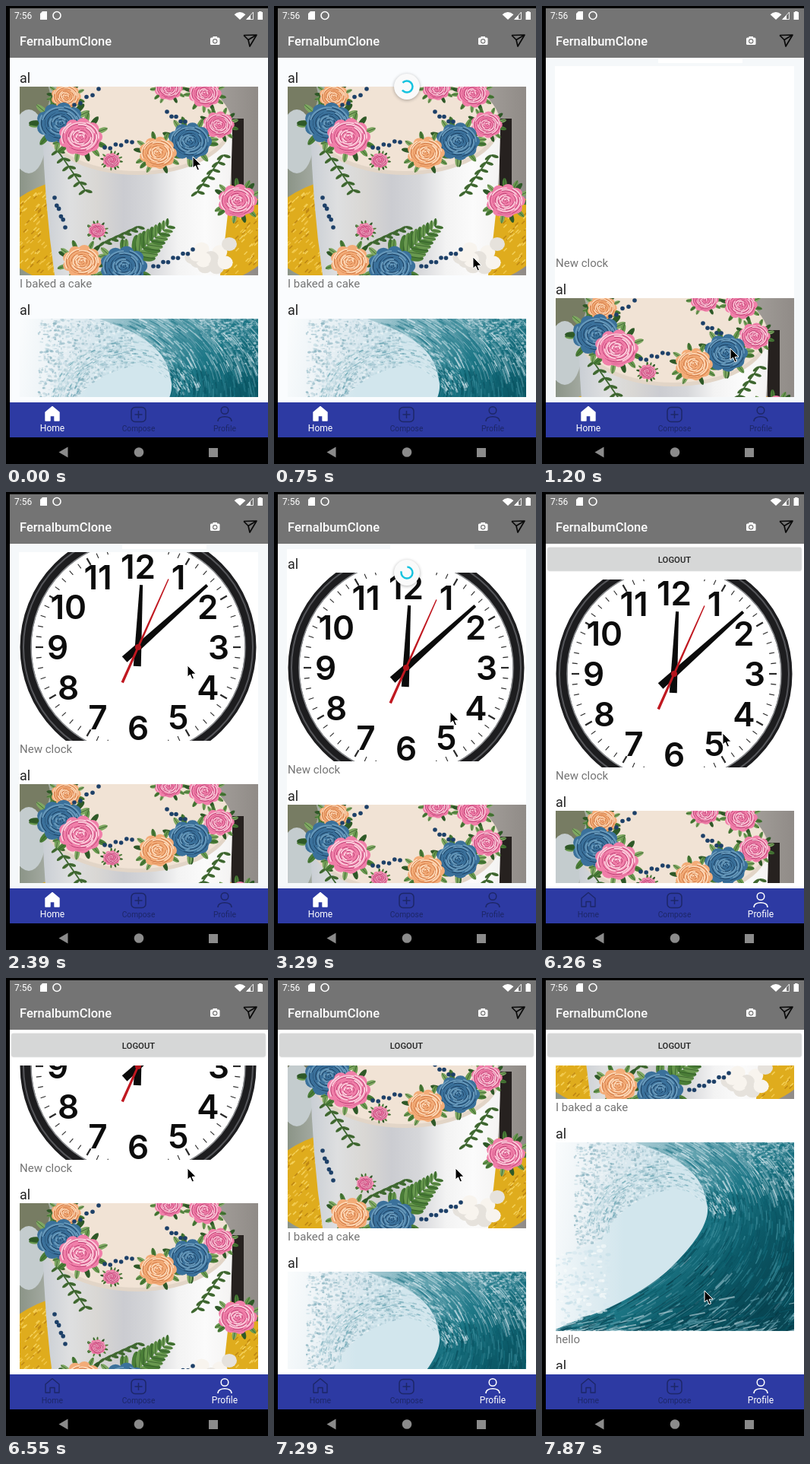
Animation, 345 px wide and 602 px high, one loop 8 s. Source, as an HTML page with a canvas:

```html
<!DOCTYPE html>
<html lang="en">
<head>
<meta charset="utf-8">
<title>Photo feed</title>
<style>
html, body { margin: 0; width: 100%; height: 100%; overflow: hidden; background: #000; }
canvas { display: block; width: 345px; height: 602px; }
</style>
</head>
<body>
<canvas id="stage" width="345" height="602"></canvas>
<script>
const LOOP = 8000, PITCH = 305, IMG_W = 314, IMG_H = 248, TAU = Math.PI * 2;
const FONT = 'Roboto, "Open Sans", sans-serif';
const ctx = document.getElementById('stage').getContext('2d');

function seeded(s) {
  return () => {
    s = (s * 1664525 + 1013904223) >>> 0;
    return s / 4294967296;
  };
}

function picture(draw) {
  const c = document.createElement('canvas');
  c.width = IMG_W;
  c.height = IMG_H;
  draw(c.getContext('2d'));
  return c;
}

function oval(g, x, y, rx, ry, fill) {
  g.beginPath();
  g.ellipse(x, y, rx, ry, 0, 0, TAU);
  g.fillStyle = fill;
  g.fill();
}

function arc(g, x, y, rx, ry, a0, a1, color, width) {
  g.beginPath();
  g.ellipse(x, y, rx, ry, 0, a0, a1);
  g.strokeStyle = color;
  g.lineWidth = width;
  g.stroke();
}

function line(g, color, width, ...p) {
  g.beginPath();
  for (let i = 0; i < p.length; i += 2) g.lineTo(p[i], p[i + 1]);
  g.strokeStyle = color;
  g.lineWidth = width;
  g.stroke();
}

function poly(g, fill, ...p) {
  g.beginPath();
  for (let i = 0; i < p.length; i += 2) g.lineTo(p[i], p[i + 1]);
  g.closePath();
  g.fillStyle = fill;
  g.fill();
}

function gradient(g, x0, y0, x1, y1, ...colors) {
  const f = g.createLinearGradient(x0, y0, x1, y1);
  colors.forEach((c, i) => f.addColorStop(i / (colors.length - 1), c));
  return f;
}

/* ---------- pictures ---------- */

const clock = picture(g => {
  const cx = 156, cy = 125;
  const polar = (a, r) => [cx + Math.sin(a) * r, cy - Math.cos(a) * r];
  const ring = (r, w, color) => arc(g, cx, cy, r, r, 0, TAU, color, w);
  const hand = (a, tail, tip, w, color) => {
    g.save();
    g.translate(cx, cy);
    g.rotate(a);
    poly(g, color, -w / 2, tail, w / 2, tail, w / 5, -tip, -w / 5, -tip);
    g.restore();
  };
  g.fillStyle = '#fff';
  g.fillRect(0, 0, IMG_W, IMG_H);
  ring(148, 15, '#1d1d1f');
  ring(151, 2, '#55565a');
  ring(141, 1.5, '#8d8f92');
  for (let i = 0; i < 60; i++) {
    const a = i * TAU / 60, major = i % 5 === 0;
    line(g, '#2a2a2a', major ? 2.2 : 1.1, ...polar(a, major ? 125 : 128), ...polar(a, 135));
  }
  g.fillStyle = '#0c0c0c';
  g.font = '600 44px Inter, Arial, sans-serif';
  g.textAlign = 'center';
  for (let n = 1; n <= 12; n++) {
    const [x, y] = polar(n * TAU / 12, 106);
    g.fillText(n, x, y + 16);
  }
  hand(.05, 25, 82, 10, '#0b0b0b');
  hand(.84, 24, 122, 10, '#0b0b0b');
  hand(.42, 51, 98, 3.6, '#c01820');
  oval(g, cx, cy, 4, 4, '#b3141c');
});

const PETALS = {
  pink: ['#f07fa9', '#b83a70', '#fbc9d9'],
  blue: ['#3b719b', '#18395a', '#6698ba'],
  peach: ['#f3ac78', '#c96f3c', '#fdd9b8']
};
const GREENS = ['#4a7d37', '#69994f', '#2f5a28', '#7fa862'];
const FLOWERS = [
  [61, 13, 19, 'peach'], [54, 48, 31, 'blue'], [80, 66, 28, 'pink'], [196, 2, 18, 'pink'],
  [244, 9, 21, 'pink'], [262, 50, 20, 'pink'], [224, 72, 28, 'blue'], [182, 87, 24, 'peach'],
  [121, 97, 11, 'pink'], [287, 150, 25, 'pink'], [102, 189, 11, 'pink'], [82, 230, 25, 'peach'],
  [137, 236, 30, 'blue']
];

const cake = picture(g => {
  const rnd = seeded(11);

  function leaf(x, y, len, a, color) {
    g.save();
    g.translate(x, y);
    g.rotate(a);
    oval(g, len / 2, 0, len / 2, len * .2, color);
    line(g, '#2f5527', .7, 0, 0, len, 0);
    g.restore();
  }

  function rose(x, y, r, kind) {
    const [base, dark, light] = PETALS[kind];
    for (let i = 0; i < 9; i++) {
      const a = i * TAU / 9;
      oval(g, x + Math.cos(a) * r * .72, y + Math.sin(a) * r * .6, r * .32, r * .29, base);
    }
    oval(g, x, y, r * .85, r * .72, base);
    // long overlapping petals that tighten toward the heart
    for (let k = 0; k < 26; k++) {
      const s = .92 - k / 30, a = k * 2.4 + rnd() * .4, span = 1.1 + rnd() * .6;
      arc(g, x, y, r * s, r * s * .84, a, a + span, k % 3 ? light : base, r * .075);
      arc(g, x, y, r * (s - .06), r * (s - .06) * .84, a, a + span, dark, .9);
    }
  }

  function along(n, x0, y0, x1, y1, put) {
    for (let i = 0; i < n; i++) put(x0 + (x1 - x0) * i / (n - 1), y0 + (y1 - y0) * i / (n - 1), i);
  }
  const berries = (...p) => along(...p, (x, y, i) => oval(g, x, y + i % 2 * 3, 2.8, 2.8, '#1d4068'));
  const vine = (...p) => {
    line(g, '#3c6430', 1.8, ...p);
    along(6, ...p, (x, y) => [.3, 2.5].forEach(a => leaf(x, y, 10, a, '#466f35')));
  };

  g.fillStyle = gradient(g, 0, 0, IMG_W, 0, '#8b9487', '#c3c6c2', '#b9b6b0', '#aaa6a1', '#908b87');
  g.fillRect(0, 0, IMG_W, IMG_H);
  oval(g, 8, 12, 32, 32, '#777c63');
  oval(g, 12, 72, 22, 42, '#c4ccce');
  g.fillStyle = '#26211f';
  g.fillRect(279, 42, 16, 90);
  oval(g, 155, 192, 186, 84, '#dfac1d');
  for (let i = 0; i < 420; i++) {
    const a = rnd() * TAU, r = .7 + rnd() * .28;
    const x = 155 + Math.cos(a) * 184 * r, y = 192 + Math.sin(a) * 82 * r;
    line(g, ['#f5d25c', '#bd8614', '#f1c74a'][i % 3], 1.5, x, y, x + 4, y - 4);
  }
  g.beginPath();
  g.moveTo(30, 50);
  g.quadraticCurveTo(32, 150, 46, IMG_H);
  g.lineTo(264, IMG_H);
  g.quadraticCurveTo(280, 140, 280, 50);
  g.fillStyle = gradient(g, 30, 0, 280, 0, '#c9ced4', '#dedfe0', '#d9d7d4', '#cbccd1', '#d6d7da', '#f3f3f3', '#fbfbfb', '#f4f3f2');
  g.fill();
  oval(g, 155, 49, 125, 67, '#e2d5c7');
  oval(g, 155, 45, 122, 66, '#f1e3d5');
  for (let i = 0; i < 12; i++) oval(g, 226 + rnd() * 52, 205 + rnd() * 38, 10, 9, i % 2 ? '#f8f4ee' : '#e6e2dc');

  vine(50, 84, 86, 136);
  vine(268, 90, 234, 138);
  vine(112, 204, 155, 184);
  FLOWERS.forEach(([x, y, r]) => {
    for (let i = 0; i < 12; i++) {
      const a = i * TAU / 12 + rnd() * .5;
      leaf(x + Math.cos(a) * r * .75, y + Math.sin(a) * r * .6, r * .6, a, GREENS[i % 4]);
    }
  });
  along(9, 152, 222, 194, 184, (x, y, i) => [-1.5, .15].forEach(a => leaf(x, y, 27 - i * 2, a, GREENS[i % 2])));
  FLOWERS.forEach(f => rose(...f));
  berries(5, 72, 24, 104, 3);
  berries(6, 112, 80, 148, 70);
  berries(5, 194, 33, 218, 46);
  berries(6, 46, 146, 60, 182);
  berries(9, 176, 236, 228, 214);
});

const wave = picture(g => {
  const rnd = seeded(5);
  const pick = list => list[Math.floor(rnd() * list.length)];
  const inner = [120, 6, 245, 48, 232, 150, 0, 246];
  const outer = [270, -30, 420, 60, 400, 260, 230, 310];
  const flow = (u, t) => {
    const q = inner.map((v, i) => v + (outer[i] - v) * u), s = 1 - t;
    return [0, 1].map(i => s * s * s * q[i] + 3 * s * s * t * q[i + 2] + 3 * s * t * t * q[i + 4] + t * t * t * q[i + 6]);
  };
  const swirl = (a, r) => [142 + Math.cos(a) * 74 * r, 124 + Math.sin(a) * 68 * r];

  g.fillStyle = gradient(g, 0, 0, 130, 20, '#fafcfd', '#eef4f7', '#dce9ef', '#d2e6ed');
  g.fillRect(0, 0, IMG_W, IMG_H);
  for (let i = 0; i < 1500; i++) {
    const x = 25 + rnd() * 125, y = rnd() * (160 - x * .55);
    g.globalAlpha = .25 + rnd() * .55;
    oval(g, x, y, .6 + rnd() * 2.2, .5 + rnd() * 1.6, pick(['#a3c4cf', '#c0d9e2', '#edf4f7', '#85b0bd']));
  }
  g.globalAlpha = 1;

  // rolling wall of water
  g.beginPath();
  g.moveTo(105, 0);
  for (let t = 0; t <= 1.001; t += .05) g.lineTo(...flow(0, t));
  g.lineTo(IMG_W, IMG_H);
  g.lineTo(IMG_W, 0);
  g.fillStyle = gradient(g, 105, 10, 290, 190, '#a5c9d2', '#5b9fac', '#1d7786', '#0c5a68', '#084653');
  g.fill();
  for (let i = 0; i < 2400; i++) {
    const u = rnd(), t = rnd(), len = .015 + rnd() * .05;
    const tones = t < .3 ? ['#b7d5dd', '#629fac', '#23788a', '#d5e7ed']
      : t < .65 ? ['#0a4f5e', '#187080', '#0b5d6b', '#3b8c9a']
        : ['#073a47', '#0a4d5b', '#2f7b89', '#0c5c6a', '#7fb0bc'];
    g.globalAlpha = .3 + rnd() * .5;
    line(g, pick(tones), .5 + rnd() * 1.6, ...flow(u, t), ...flow(u, t + len / 2), ...flow(u, t + len));
  }

  // bright hollow, open toward the left
  g.globalAlpha = 1;
  g.beginPath();
  g.moveTo(60, 130);
  g.bezierCurveTo(76, 88, 128, 58, 178, 60);
  g.bezierCurveTo(218, 76, 202, 118, 146, 170);
  g.bezierCurveTo(108, 202, 60, 226, 0, 242);
  g.lineTo(0, 150);
  g.fillStyle = gradient(g, 0, 0, 90, 0, '#f3f8fa', '#e0edf2', '#d2e6ed');
  g.fill();
  for (let i = 0; i < 700; i++) {
    const a = 3.2 + rnd() * 2.7, r = .96 + rnd() * .45;
    g.globalAlpha = .3 + rnd() * .5;
    line(g, pick(['#dcebf0', '#a5cad4', '#cfe3ea', '#6aa5b3']), .6 + rnd() * 1.3, ...swirl(a, r), ...swirl(a + .06, r));
  }
  for (let i = 0; i < 420; i++) {
    const x = 235 + rnd() * 79, y = rnd() * rnd() * (x - 215);
    oval(g, x, y, .6 + rnd() * 2, .5 + rnd(), pick(['#4e929f', '#8db9c4', '#c0d9e1']));
  }
  for (let i = 0; i < 160; i++) {
    const x = rnd() * IMG_W, y = 250 - rnd() * rnd() * (14 + x * .15);
    line(g, pick(['#0a4453', '#b3d0d8', '#5d9ba8', '#0b5665']), 1 + rnd() * 1.5, x, y, x + 8 + rnd() * 14, y - 4);
  }
  for (let i = 0; i < 160; i++) {
    const x = rnd() * 70, y = 150 + rnd() * 92 - x * .3;
    oval(g, x, y, 1 + rnd() * 3, 1 + rnd() * 1.5, pick(['#f6fafb', '#d5e7ee', '#c4dde6']));
  }
  g.globalAlpha = 1;
});

/* ---------- motion ---------- */

const stepTime = k => 150 * k - 10 * Math.max(0, Math.ceil(8 * (k / 53) ** 3.5 - .1));

function hold(t) {
  let k = 0;
  while (stepTime(k + 1) <= t) k++;
  return stepTime(k);
}

const clamp = v => Math.max(0, Math.min(1, v));
function ease(t, from, to) {
  const u = clamp((t - from) / (to - from));
  return u * u * (3 - 2 * u);
}

// Hand movements: start, end, and the point reached.
const MOVES = [
  [150, 600, 262, 330], [1050, 1200, 248, 450], [2090, 2540, 236, 150],
  [2540, 2990, 232, 289], [3290, 4340, 278, 549], [5370, 5960, 238, 349],
  [6085, 6550, 239, 250], [7290, 7440, 230, 190], [7440, 7870, 214, 411]
];

function pointerAt(t) {
  let x = 246, y = 198;
  for (const [from, to, px, py] of MOVES) {
    const u = ease(t, from, to);
    x += (px - x) * u;
    y += (py - y) * u;
  }
  return [Math.round(x), Math.round(y)];
}

const homeTop = t => t < 900 ? 95 - PITCH : 68 + 27 * ease(t, 2540, 2750);
const profileTop = t => 130 - 365 * ease(t, 6085, 7140) - 170 * ease(t, 7290, 7730);

/* ---------- screen ---------- */

function label(text, x, y, size, color, align = 'left', weight = 400) {
  ctx.font = `${weight} ${size}px ${FONT}`;
  ctx.textAlign = align;
  ctx.fillStyle = color;
  ctx.fillText(text, x, y);
}

function box(x, y, w, h, fill) {
  ctx.fillStyle = fill;
  ctx.fillRect(x, y, w, h);
}

function clipped(x, y, w, h, draw) {
  ctx.save();
  ctx.beginPath();
  ctx.rect(x, y, w, h);
  ctx.clip();
  draw();
  ctx.restore();
}

const POSTS = [[clock, 'New clock'], [cake, 'I baked a cake'], [wave, 'hello'], [null, '']];

function feed(top, edge, clockReady) {
  clipped(5, edge, 340, 514 - edge, () => POSTS.forEach(([img, caption], i) => {
    const y = Math.round(top + i * PITCH);
    label('al', 18, y + 6, 18, '#222');
    if (img && (i || clockReady)) ctx.drawImage(img, 18, y + 11);
    label(caption, 18, y + 275, 15, '#757575');
  }));
}

function spinner(t, from, rest, done) {
  const scale = 1 - clamp((t - done) / 150);
  if (t <= from || !scale) return;
  clipped(5, 68, 340, 450, () => {
    ctx.translate(175, 50 + 56 * ease(t, from, rest));
    ctx.scale(scale, scale);
    ctx.shadowColor = 'rgba(0,0,0,.3)';
    ctx.shadowBlur = 4;
    ctx.shadowOffsetY = 1;
    oval(ctx, 0, 0, 17, 17, '#fafafa');
    ctx.shadowColor = 'transparent';
    const a = 3 + (t - rest) / 170;
    arc(ctx, 0, 0, 7.5, 7.5, a, a + 4.9, '#16c3df', 2.5);
  });
}

function topBar() {
  box(5, 3, 340, 65, '#747474');
  label('7:56', 11, 17, 12, '#fff');
  poly(ctx, '#fff', 45, 10, 48, 7, 54, 7, 54, 18, 45, 18);
  arc(ctx, 67, 12.5, 5, 5, 0, TAU, '#fff', 1.6);
  ctx.beginPath();
  ctx.moveTo(308, 18);
  ctx.arc(308, 18, 10, -2.4, -.74);
  ctx.fillStyle = '#fff';
  ctx.fill();
  line(ctx, '#e8e8e8', 1, 317, 17.5, 325.5, 17.5, 325.5, 8, 317, 17.5);
  poly(ctx, '#fff', 316, 18, 322, 12, 322, 18);
  box(331.5, 8, 6.5, 10, '#fff');
  box(333, 7, 3.5, 1, '#fff');
  label('FernalbumClone', 18, 52, 16.5, '#fff', 'left', 500);
  ctx.beginPath();
  ctx.roundRect(269, 41.5, 12.5, 9.5, 1.5);
  ctx.fill();
  box(272.5, 40, 5.5, 2, '#fff');
  oval(ctx, 275.2, 46.2, 3.2, 3.2, '#747474');
  oval(ctx, 275.2, 46.2, 2, 2, '#fff');
  ctx.lineJoin = 'round';
  line(ctx, '#0a0a0a', 1.7, 313, 38.5, 330, 38, 321, 53, 319, 44.5, 313, 38.5);
  line(ctx, '#0a0a0a', 1.7, 319, 44.5, 329, 38.5);
}

function bottomBar(onProfile, t) {
  const idle = '#1d2768';
  box(5, 521, 340, 46, '#2d3aa3');
  const reach = 61 * clamp((t - 4640) / 440);
  if (reach && t < 5370) clipped(5, 521, 340, 46, () => oval(ctx, 288, 545, reach, reach, '#27338c'));

  const homeColor = onProfile ? idle : '#fff';
  const profileColor = !onProfile ? idle : t < 5370 ? '#c4c8e4' : '#fff';
  const half = [9, 534, 9, 545, 3, 545, 3, 538.5];
  const house = [61, 526.5];
  for (let i = 0; i < 8; i += 2) house.push(61 + half[i], half[i + 1]);
  for (let i = 6; i >= 0; i -= 2) house.push(61 - half[i], half[i + 1]);
  house.push(61, 526.5);
  if (!onProfile) poly(ctx, '#fff', ...house);
  line(ctx, homeColor, 1.4, ...house);
  label('Home', 61, 559, onProfile ? 10.5 : 12, homeColor, 'center');

  ctx.beginPath();
  ctx.roundRect(165, 527.5, 19, 19, 5);
  ctx.strokeStyle = idle;
  ctx.lineWidth = 1.5;
  ctx.stroke();
  line(ctx, idle, 1.5, 174.5, 532, 174.5, 542);
  line(ctx, idle, 1.5, 169.5, 537, 179.5, 537);
  label('Compose', 174.5, 558.5, 10.2, idle, 'center');

  arc(ctx, 288, 531.5, 4.8, 4.8, 0, TAU, profileColor, 1.5);
  ctx.beginPath();
  ctx.moveTo(279, 546);
  ctx.bezierCurveTo(279, 537.5, 297, 537.5, 297, 546);
  ctx.stroke();
  label('Profile', 288, 559, onProfile ? 12 : 10.5, profileColor, 'center');

  poly(ctx, '#8b8b8b', 69.5, 586.5, 81.5, 579.5, 81.5, 593.5);
  oval(ctx, 175, 586.5, 6.3, 6.3, '#8b8b8b');
  box(267, 581, 12, 12, '#8b8b8b');
}

function pointer(x, y) {
  const shape = [0, 0, 0, 15, 3.5, 12, 6, 18, 8.5, 17, 6, 11.3, 11, 11].map((v, i) => v + (i % 2 ? y : x));
  poly(ctx, '#000', ...shape);
  ctx.lineJoin = 'miter';
  line(ctx, '#fff', 1, ...shape, x, y);
}

function home(t) {
  box(5, 68, 340, 453, t < 900 ? '#fafcfe' : '#f5f8fa');
  if (t >= 900) {
    const edge = t < 2540 ? 79 : 75;
    box(17, edge, 315, 514 - edge, '#fff');
    box(153, 69, 111, 6, '#fff');
  }
  feed(homeTop(t), 79, t >= 1650);
  if (t < 2090) spinner(t, 150, 600, 1050);
  else spinner(t, 2540, 2990, 3740);
}

function profile(t) {
  box(5, 68, 340, 453, '#fff');
  if (t >= 5500) feed(profileTop(t), 115, true);
  ctx.save();
  ctx.shadowColor = 'rgba(0,0,0,.25)';
  ctx.shadowBlur = 2;
  ctx.beginPath();
  ctx.roundRect(7.5, 73, 334, 30.5, 2);
  ctx.fillStyle = '#d6d7d7';
  ctx.fill();
  ctx.restore();
  label('LOGOUT', 174.5, 93, 11.3, '#222', 'center', 500);
}

function render(t) {
  const onProfile = t >= 4640;
  box(0, 0, 345, 602, '#000');
  (onProfile ? profile : home)(t);
  topBar();
  bottomBar(onProfile, t);
  pointer(...pointerAt(t));
}

function tick() {
  render(hold(performance.now() % LOOP));
  requestAnimationFrame(tick);
}
tick();
</script>
</body>
</html>
```
